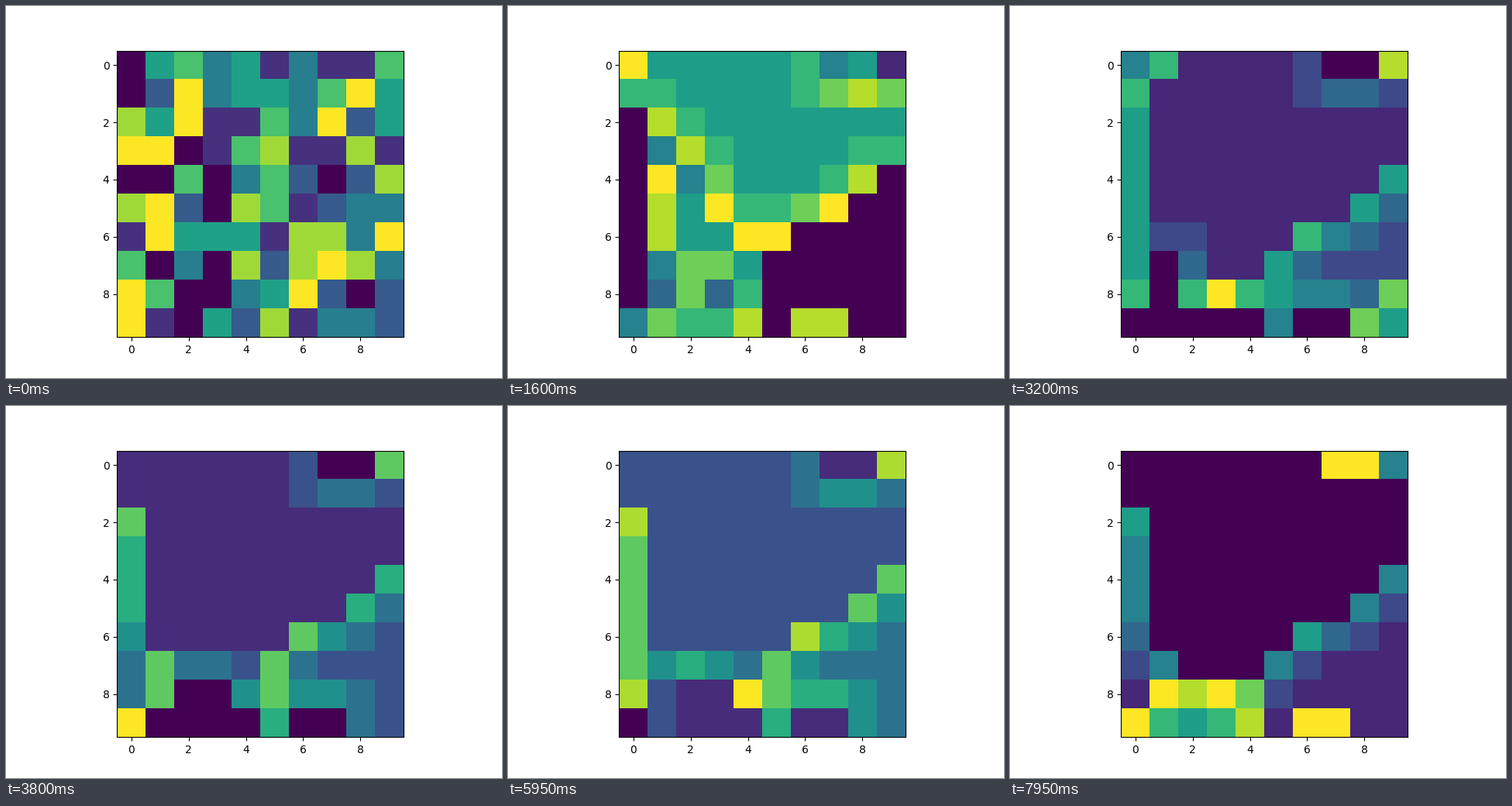
A matplotlib script that plays this animation: 640x480 px, repeating every 8000 ms.

```python
import numpy as np
import matplotlib.pyplot as plt
from matplotlib.animation import FuncAnimation

STEPS = 160
INTERVAL = 50
FLASH = 9  # a cell above this level flashes and resets

START = np.array([
    [1, 5, 6, 4, 5, 2, 4, 2, 2, 6],
    [1, 3, 8, 4, 5, 5, 4, 6, 8, 5],
    [7, 5, 8, 2, 2, 6, 4, 8, 3, 5],
    [8, 8, 1, 2, 6, 7, 2, 2, 7, 2],
    [1, 1, 6, 1, 4, 6, 3, 1, 3, 7],
    [7, 8, 3, 1, 7, 6, 2, 3, 4, 4],
    [2, 8, 5, 5, 5, 2, 7, 7, 4, 8],
    [6, 1, 4, 1, 7, 3, 7, 8, 7, 4],
    [8, 6, 1, 1, 4, 5, 8, 3, 1, 3],
    [8, 2, 1, 5, 3, 7, 2, 4, 4, 3],
])


def neighbour_count(mask):
    """Number of set cells among the eight neighbours of each cell."""
    rows, cols = mask.shape
    padded = np.pad(mask.astype(int), 1)
    block = sum(padded[r:r + rows, c:c + cols]
                for r in range(3) for c in range(3))
    return block - mask


def advance(grid):
    """Charge every cell by one, then let flashes spread until none is left."""
    grid = grid + 1
    flashed = np.zeros(grid.shape, dtype=bool)
    while True:
        fresh = (grid > FLASH) & ~flashed
        if not fresh.any():
            break
        flashed |= fresh
        grid = grid + neighbour_count(fresh)
    grid[flashed] = 0
    return grid


def simulate(grid, steps):
    history = [grid]
    while len(history) < steps:
        history.append(advance(history[-1]))
    return history


grids = simulate(START, STEPS)

fig, ax = plt.subplots(figsize=(6.4, 4.8), dpi=100)
image = ax.imshow(grids[0], cmap="viridis")


def update(step):
    image.set_data(grids[step])
    image.autoscale()  # colours span each grid's own range
    return [image]


anim = FuncAnimation(fig, update, frames=STEPS, interval=INTERVAL, repeat=True)
plt.show()
```
